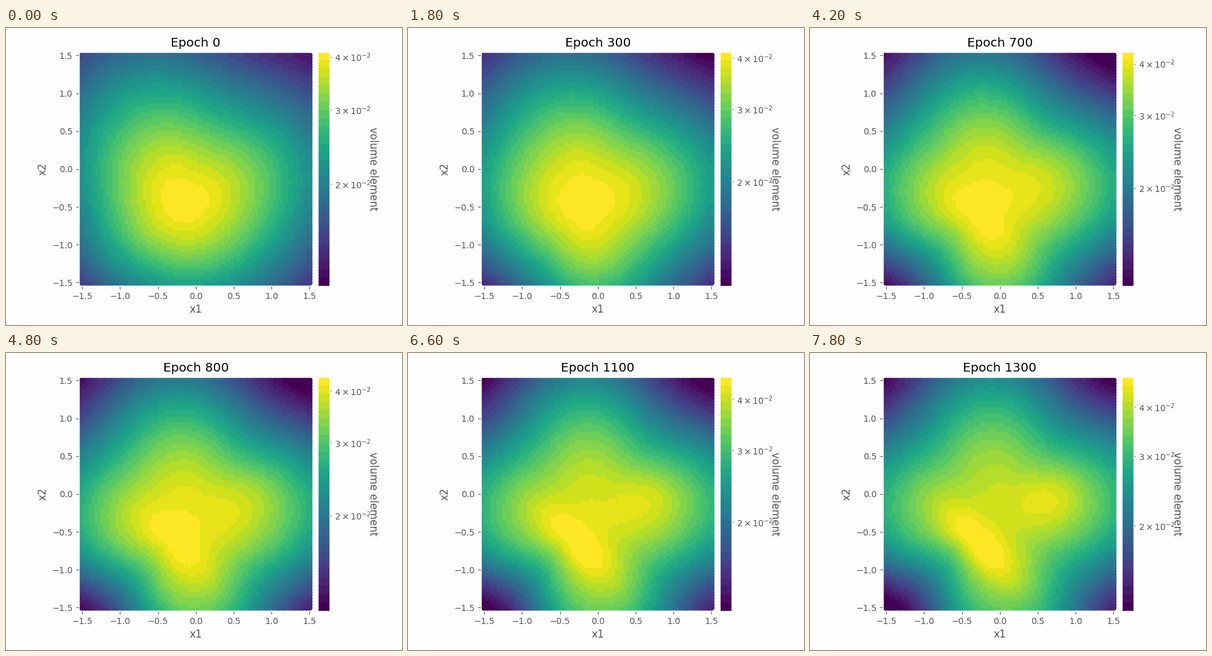
These frames come from a looping animation (640 by 480 pixels, 8 s). A matplotlib script:

```python
import matplotlib.pyplot as plt
import numpy as np
from matplotlib.animation import FuncAnimation

W, H, DPI = 640, 480, 100
LEFT, RIGHT, TOP, BOTTOM = 117.5, 496.1, 38.6, 417.2
LIMIT = 1.547
STEP_MS, TICK_MS, LOOP_MS = 300, 100, 8000
EPOCHS_PER_STEP, LAST_EPOCH = 50, 1300
BANDS = 28
GRAY = "#555555"
PAPER = "#fefefe"

plt.rcParams.update({
    "font.family": "DejaVu Sans",
    "font.size": 10,
    "axes.edgecolor": "white",
    "axes.linewidth": 1,
    "axes.labelcolor": GRAY,
    "axes.labelsize": 12,
    "axes.titlesize": 14.4,
    "xtick.color": GRAY,
    "ytick.color": GRAY,
})

# Distance from the hill's centre to its half-height contour, every 30 degrees.
ROUND_HILL = np.array([1.60, 1.72, 1.52, 1.63, 1.75, 1.54,
                       1.29, 1.22, 1.16, 1.18, 1.24, 1.37])
LOBED_HILL = np.array([1.97, 1.75, 1.47, 1.75, 1.52, 1.57,
                       1.75, 1.25, 1.26, 1.90, 1.66, 1.42])

side = np.linspace(-1.5, 1.5, 76)
x, y = (g.ravel() for g in np.meshgrid(side, side, indexing="ij"))


def mix(a, b, amount):
    return a + (b - a) * amount


def smooth_outline(radii, angle):
    """Closed curve through evenly spaced radii, as a Fourier series."""
    waves = np.fft.rfft(radii) / len(radii)
    waves[1:-1] *= 2
    return sum((c * np.exp(1j * k * angle)).real for k, c in enumerate(waves))


def bump(cx, cy, long, short, tilt=0):
    dx, dy = x - cx, y - cy
    along = dx * np.cos(tilt) + dy * np.sin(tilt)
    across = dy * np.cos(tilt) - dx * np.sin(tilt)
    return np.exp(-((along / long) ** 2 + (across / short) ** 2) / 2)


ridge = bump(-0.25, -0.68, 0.5, 0.19, -np.pi / 4)
east_peak = bump(0.75, -0.03, 0.35, 0.28)


def field(epoch):
    """Relative log height: a hill that grows lobes, then two peaks."""
    progress = epoch / LAST_EPOCH
    early, late = 1 - (1 - progress) ** 1.5, progress ** 2
    dx = x - mix(-0.15, -0.05, late)
    dy = y - mix(-0.45, -0.25, late)
    radius = smooth_outline(mix(ROUND_HILL, LOBED_HILL, early),
                            np.arctan2(dy, dx))
    top = mix(1.5, 1.4, late)
    power = mix(1.8, 2.4, early)
    hill = top ** (1 - (np.hypot(dx, dy) / radius) ** power) - 0.5
    return hill + late * (0.15 * ridge + 0.09 * east_peak)


def pixel_axes(left, top, right, bottom):
    return fig.add_axes([left / W, 1 - bottom / H,
                         (right - left) / W, (bottom - top) / H])


fig = plt.figure(figsize=(W / DPI, H / DPI), dpi=DPI, facecolor=PAPER)
cmap = plt.get_cmap("viridis", BANDS)

ax = pixel_axes(LEFT, TOP, RIGHT, BOTTOM)
ax.set_facecolor(PAPER)
cloud = ax.scatter(x, y, c=field(0), s=7.5 ** 2, linewidths=0,
                   cmap=cmap, vmin=0, vmax=1)
ticks = np.linspace(-1.5, 1.5, 7)
ax.set(xlim=(-LIMIT, LIMIT), ylim=(-LIMIT, LIMIT),
       xticks=ticks, yticks=ticks, xlabel="x1", ylabel="x2")
title = ax.set_title("Epoch 0")

bar = pixel_axes(504.4, TOP, 523.3, BOTTOM)
bar.imshow(np.linspace(1, 0, BANDS)[:, None], cmap=cmap, aspect="auto",
           interpolation="nearest", extent=(0, 1, BOTTOM, TOP))
bar.set_xticks([])
bar.yaxis.tick_right()
bar.tick_params(axis="y", length=2, width=0.6, pad=3.4)
fig.text(593 / W, 1 - 227.8 / H, "volume element", rotation=270, color=GRAY,
         fontsize=12, ha="center", va="center")


def draw_scale(epoch):
    four = 46.5 + 40.5 * (epoch / LAST_EPOCH) ** 2.1
    octave = np.interp(epoch, [0, 300, 950, 1300], [205.5, 199.5, 202, 192])
    marks = (2, 3, 4)
    bar.set_yticks([four + octave * np.log2(4 / n) for n in marks],
                   [rf"$\mathdefault{{{n}\times10^{{-2}}}}$" for n in marks])
    bar.set_ylim(BOTTOM, TOP)


def draw(frame):
    epoch = EPOCHS_PER_STEP * (frame * TICK_MS // STEP_MS)
    cloud.set_array(field(epoch))
    title.set_text(f"Epoch {epoch}")
    draw_scale(epoch)
    return cloud, title


animation = FuncAnimation(fig, draw, frames=LOOP_MS // TICK_MS,
                          interval=TICK_MS, repeat=True, repeat_delay=0)
plt.show()
```
